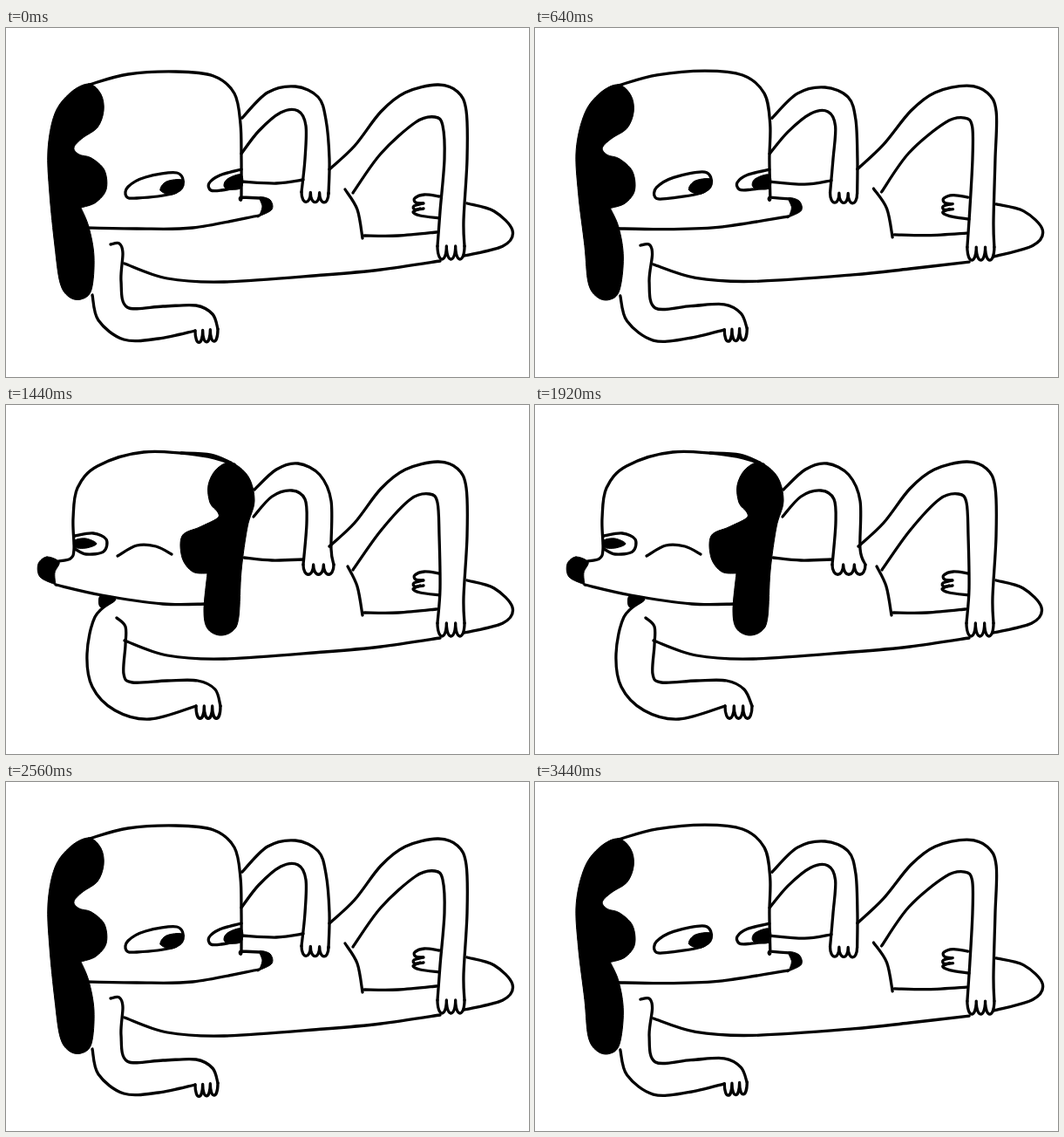
An HTML page that plays this animation: 600 px wide and 400 px high, repeating every 3520 ms.

```html
<!DOCTYPE html>
<html lang="en">
<head>
<meta charset="utf-8">
<title>Lounging dog</title>
<style>
html, body { margin: 0; width: 100%; height: 100%; overflow: hidden; background: #fff; }
svg { display: block; width: 100vw; height: 100vh; }
path { fill: none; stroke: #000; stroke-width: 3.3; stroke-linecap: round; stroke-linejoin: round; }
.ink { fill: #000; stroke-width: 1; }
.paper { fill: #fff; }
</style>
</head>
<body>
<svg id="stage" viewBox="0 0 600 400"></svg>
<script>
const stage = document.getElementById("stage");
const STEP = 80, COUNT = 44;
let phase = 0, out = "";

// Redrawn-line wobble: still in phase 0, slightly bent in the others.
function warp([x, y]) {
  const amp = phase ? 1.2 : 0;
  return [x + amp * Math.sin(y / 23 + phase * 2), y + amp * Math.sin(x / 31 + phase * 2)];
}

const add = (d, kind = "") => out += `<path class="${kind}" d="${d}"/>`;

// Smooth stroke through points; a repeated point makes a corner.
function stroke(text, kind = "", closed = false) {
  const p = text.split(" ").map(s => warp(s.split(",").map(Number)));
  const n = p.length;
  const at = i => closed ? p[(i + n) % n] : p[Math.max(0, Math.min(n - 1, i))];
  let d = "M" + p[0];
  for (let i = 0; i < (closed ? n : n - 1); i++) {
    const [a, b, c, e] = [at(i - 1), at(i), at(i + 1), at(i + 2)];
    const lean = (from, u, v, s) => from.map((q, k) => (q + s * (v[k] - u[k]) / 6).toFixed(1));
    d += `C${lean(b, a, c, 1)} ${lean(c, b, e, -1)} ${c}`;
  }
  add(d + (closed ? "Z" : ""), kind);
}
const shape = (text, kind = "ink") => stroke(text, kind, true);

// A row of rounded fingers between two points.
function fingers(x, y, endX, endY, depth, count = 3) {
  const w = (endX - x) / count, h = (endY - y) / count;
  let d = "M" + warp([x, y]);
  for (let i = 0; i < count; i++) d += `c0 ${depth} ${w} ${depth} ${w} ${h}`;
  add(d);
}

function moved(x, y, paint) {
  out += `<g transform="translate(${x} ${y})">`;
  paint();
  out += "</g>";
}

function legs(k) {
  stroke("371,162 400,135 430,96 458,74 495,65 518,73 528,95 529,150 525,220 526,250");
  stroke(`398,189 430,144 ${470 + k},108 ${492 + k},102 ${501 + k},112 ${503 + k},150 498,210 495,250`);
  fingers(495, 250, 526, 250, 20);
  stroke(`${389 + k / -2},185 403,208 409,241`);
  stroke("411,238 450,238 494,234");
  stroke("497,193 480,191 469,195 470,200 479,201");
  stroke("478,201 468,204 469,208 479,207");
  stroke("475,207 467,211 475,215 497,218");
  stroke("529,201 560,210 581,232 570,250 526,261");
  stroke("498,267 430,277 365,283 250,291 185,287 136,270");
}

function rightBody(lift) {
  legs(0);
  stroke("271,103 300,74 332,67 358,79 367,105 371,150 370,190");
  stroke("270,144 290,118 315,97 335,95 344,112 343,150 339,188");
  fingers(339, 188, 370, 189, 15);
  stroke("270,176 310,178 341,174");
  stroke("99,306 106,335 135,357 175,356 217,347");
  const arm = "120,248 130,247 134,258 132,290 139,320 180,319 218,318 ";
  stroke(arm + (lift ? "234,325 239,336 239,336 250,335 258,344 252,352 237,344" : "237,328 243,345"));
  fingers(217, 347, lift ? 236 : 243, 345, 18);
}

function rightHead() {
  stroke("95,65 140,53 195,50 238,55 262,75 269,110 270,150 270,194 270,194 292,195");
  stroke("290,215 214,229 150,230 91,229");
  shape("196,166 160,171 140,182 138,193 150,195 190,190 203,180", "paper");
  shape("177,186 184,176 202,174 201,184 190,191");
  stroke("270,162 245,169 233,178 235,186 247,186 269,182");
  shape("270,168 254,173 250,181 256,185 270,183");
  shape("95,64 109,76 112,95 105,114 88,126 78,137 84,145 98,149 113,163 115,185 103,200 " +
    "86,206 86,206 95,228 101,262 98,300 86,311 72,308 62,292 56,250 50,190 48,140 56,98 74,74");
  shape("291,194 303,197 305,208 290,216 290,216 294,205");
}

function leftBody(lift) {
  const k = lift ? 3 : 0;
  legs(-6);
  stroke(`285,97 310,74 335,67 360,80 373,110 373,165 ${376 + k},183`);
  stroke("284,128 305,105 328,98 343,108 345,135 341,183");
  fingers(341, 183, 376 + k, 183, 15);
  stroke("273,175 305,178 341,177");
  stroke("123,224 102,243 93,285 99,323 125,350 165,360 218,345");
  stroke(`127,244 137,254 137,275 135,308 145,318 185,316 220,316 240,326 ${246 + k},345`);
  fingers(218, 345, 246 + k, 345, 19);
}

function leftHead() {
  stroke("262,68 225,58 158,54 105,70 82,95 77,130 78,165 74,176 60,179");
  stroke("201,55 235,57 258,66");
  stroke("57,206 110,218 180,228 229,228");
  stroke("79,150 100,147 115,154 112,168 92,171 79,165");
  stroke("128,173 150,161 172,162 190,171");
  shape("79,155 92,153 104,159 92,164 79,163");
  shape("258,66 278,82 285,110 277,140 270,190 267,243 260,259 245,264 231,256 227,235 " +
    "231,193 231,193 214,191 202,175 202,150 222,140 242,130 243,123 234,112 232,92 241,74");
  shape("47,174 37,182 39,197 57,206 57,206 56,192 61,180");
  shape("108,219 126,223 109,232");
}

// Head passing through the middle, ears swinging out.
function frontHead(earX) {
  shape("80,110 110,62 175,50 245,63 270,110 258,200 175,230 92,200", "paper");
  shape("252,72 283,130 285,215 270,234 255,215 254,140");
  stroke("120,165 139,156 158,165");
  stroke("188,165 207,156 226,165");
  shape("148,205 162,194 176,205 162,216");
  stroke("118,210 165,220 212,210");
  shape(`98,72 55,120 ${earX},215 50,240 75,225 90,140`);
}

function picture(n) {
  out = "";
  const left = n > 13 && n < 28;
  phase = (n < 28 ? n : n + 1) % 3;
  if (left) leftBody(n > 22 && n < 26);
  else rightBody(n > 36 && n < 40);
  if (n === 13) frontHead(25);
  else if (n === 27) frontHead(15);
  else if (n === 14) moved(3, -5, leftHead);
  else if (n === 28) moved(-4, 2, rightHead);
  else (left ? leftHead : rightHead)();
  return out;
}

let shown = -1;
const start = performance.now();
function tick() {
  const n = Math.floor((performance.now() - start) / STEP) % COUNT;
  if (n !== shown) stage.innerHTML = picture(shown = n);
  requestAnimationFrame(tick);
}
tick();
</script>
</body>
</html>
```
